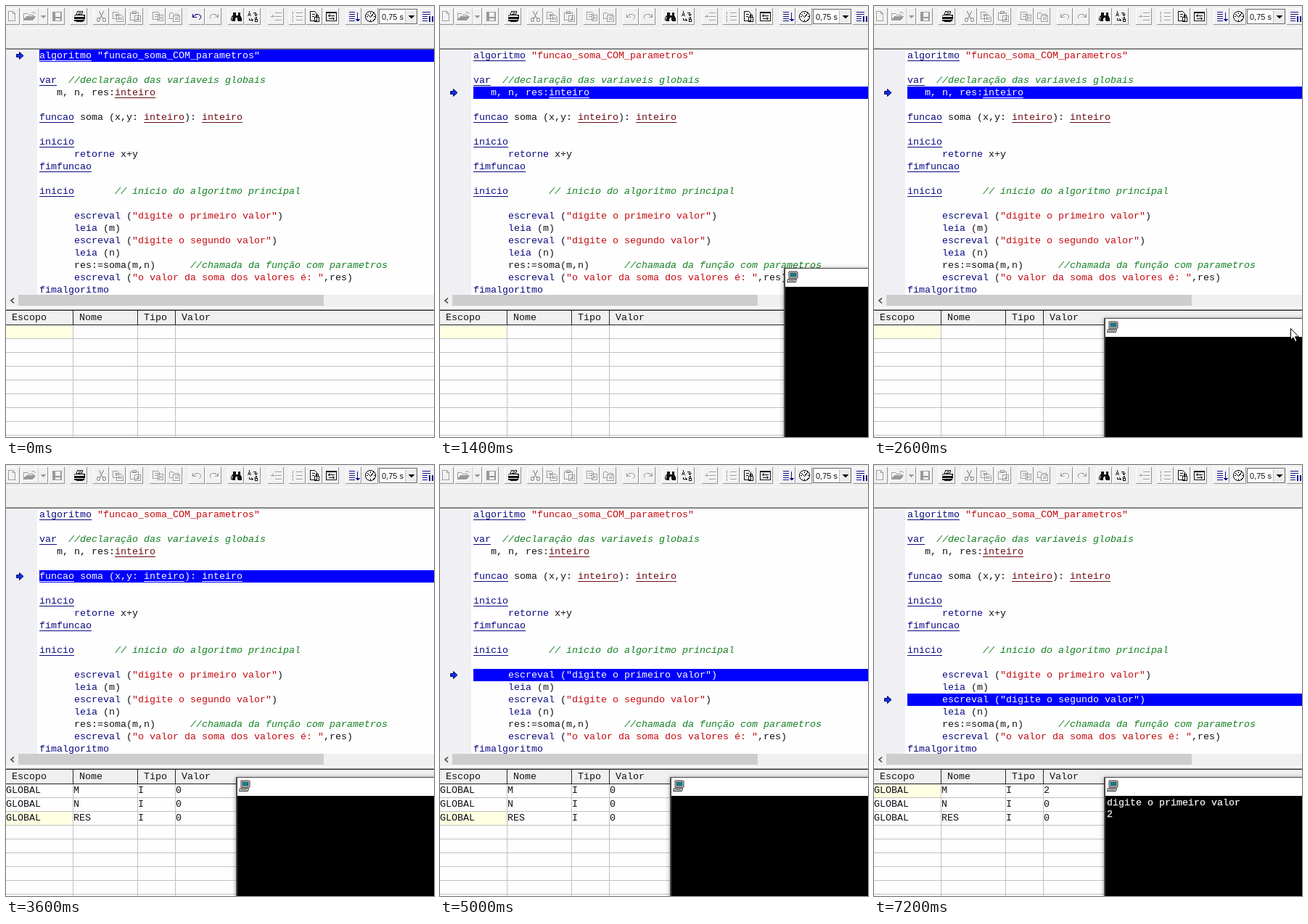
An HTML page for the animation above (8 s loop, 590 by 594 pixels).

```html
<!DOCTYPE html>
<html lang="pt">
<head>
<meta charset="utf-8">
<title>Passo a passo</title>
<style>
html, body { margin: 0; width: 100%; height: 100%; overflow: hidden; background: #fff; }
svg { display: block; width: 590px; height: 594px; }
text { font: 13.333px "Liberation Mono", "Courier New", monospace; white-space: pre; fill: #101018; }
.ui { font: 11px "Liberation Sans", Arial, sans-serif; }
.key, .cmd { fill: #0a0a80; }
.type { fill: #6c0c14; }
.str { fill: #c40a10; }
.note { fill: #128020; font-style: italic; }
.bar { fill: none; }
.on .bar { fill: #0000fc; }
.on text, .on tspan, .on .line { fill: #fff; }
.term { fill: #f4f4f4; stroke: #f4f4f4; stroke-width: .25; }
#console { filter: drop-shadow(0 1px 3px rgba(0, 0, 0, .4)); }
.ico { color: #101010; }
.off { color: #999; }
.blue { color: #10108c; }
.ico path { fill: none; stroke: currentColor; }
.ico .solid { fill: currentColor; stroke: none; }
.ico .lit { stroke: none; }
.off .lit { stroke: #fff; }
</style>
</head>
<body>
<svg viewBox="0 0 590 594" shape-rendering="crispEdges">
  <rect width="590" height="594" fill="#fefefe"/>
  <rect width="590" height="59" fill="#f0f0f0"/>
  <path d="M0 30.500H590" stroke="#fafafa"/>
  <path d="M0 58.500H590" stroke="#a0a0a0"/>
  <path d="M0 59.500H590" stroke="#696969"/>
  <g id="tools"></g>
  <rect y="60" width="43" height="338" fill="#f0f0f4"/>
  <g id="code"></g>
  <g id="arrow" shape-rendering="auto">
    <path d="M14.5 6.5H18.5V3.5L24 8.5L18.5 13.5V10.5H14.5Z" fill="#1030e0" stroke="#000070"/>
  </g>
  <rect y="398" width="590" height="22" fill="#f0f0f0"/>
  <rect x="17" y="398" width="421" height="15" fill="#cdcdcd"/>
  <path d="M11 402.5L7 406L11 409.5" fill="none" stroke="#404040" stroke-width="1.6" shape-rendering="auto"/>
  <path d="M0 415.500H590" stroke="#fff"/>
  <g id="table"></g>
  <g id="console">
    <rect width="400" height="400" fill="#484848"/>
    <rect x="2" y="1" width="400" height="25" fill="#fff"/>
    <rect x="2" y="26" width="400" height="400" fill="#000"/>
    <g shape-rendering="auto">
      <path d="M7 5H18L19 6V14H7Z" fill="#d8d8d0" stroke="#333"/>
      <rect x="9" y="7" width="8" height="5" fill="#108098" stroke="#222" stroke-width=".6"/>
      <path d="M5.5 15.5H17.5L16.5 19.5H4.5Z" fill="#d8d8d0" stroke="#333"/>
      <path d="M7 17.5H15" stroke="#555"/>
    </g>
    <text id="out" class="term" x="4" y="39">digite o primeiro valor</text>
    <text id="typed" class="term" x="4" y="55">2</text>
    <rect id="caret" x="4" y="43" width="1" height="16" fill="#fff"/>
  </g>
  <path id="mouse" d="M.5 .5V16L4 12.7L6.6 18.5L9 17.4L6.5 11.8H11.3Z" fill="#fff" stroke="#000" shape-rendering="auto"/>
</svg>
<script>
const $ = id => document.getElementById(id);

// Toolbar: [left, width, icon class, outline around the button centre, filled parts]
const lines = 'M-2 -5H7M-2 0H7M-2 5H7';
const tools = [
  [-3, 22, 'off', 'M-5 -7H1L4 -4V6H-5ZM1 -7V-4H4'],
  [21, 37, 'off', 'M-15 5V-4H-10L-8 -2H-2V0M-15 5L-11 0H1L-3 5ZM-4 -5Q0 -7 1 -3', 'M-15 5L-11 0H1L-3 5Z'],
  [59, 22, 'off', 'M-6 -6H6V6H-6Z', 'M-6 -6H-3V0H4V-6H6V6H4V2H-3V6H-6Z'],
  [89, 23, '', 'M-4 -1L-2 -7H5L4 -1M-7 0L-5 -2H8L6 0M8 -2V3L6 5M-4 7H5M-1 -5H3M-2 -3H2', 'M-7 0H7V3H-7ZM-7 4H7V6H-7Z'],
  [120, 22, 'off', 'M-3 -7L2 3M3 -7L-2 3M-4 2A2 2.5 0 1 0 -3.9 2M4 2A2 2.5 0 1 0 4.1 2'],
  [143, 22, 'off', 'M-7 -6H-1L1 -4V3H-7ZM-5 -3H-1M-5 -1H-1M-2 -2H4L7 1V7H-2ZM0 2H5M0 4H5'],
  [167, 22, 'off', 'M-7 -5H4V5H-7ZM-4 -7H1V-4H-4ZM-1 -1H7V7H-1ZM1 2H5M1 4H5'],
  [198, 22, 'off', 'M-7 -6H0L2 -4V4H-7ZM-5 -3H0M-5 0H0M0 -2H7V6H0ZM2 1H5M2 3H5'],
  [221, 22, 'off', 'M-7 -5H-3L-1 -3H5V0M-7 -5V3H-3M-2 -1H7V7H-2ZM0 2H5M0 4H5'],
  [252, 22, 'undo', 'M-6 -4V1H-1M-6 1Q-2 -5 4 -2Q7 1 3 4'],
  [275, 22, 'off', 'M6 -4V1H1M6 1Q2 -5 -4 -2Q-7 1 -3 4'],
  [306, 22, '', 'M-4 -5V-2L-7 2V5H-2V0H2V5H7V2L4 -2V-5', 'M-6 1H-2V6H-6ZM2 1H7V6H2ZM-4 -6H-1V2H-5ZM2 -6H5V2H2ZM-2 -2H2V1H-2Z'],
  [329, 22, '', 'M-7 0L-5 -6L-3 0M-6 -2H-4M3 1V7H6V4H3M3 4H5V1H3M0 -5H4V-1M2 -3L4 -1L6 -3M-5 2V5H0M-2 3L0 5L-2 7'],
  [361, 22, 'off', lines + 'M-8 0H-3M-5 -2L-3 0L-5 2'],
  [390, 23, 'off', lines + 'M-6 -7V-3M-6 -2V2M-6 3V7'],
  [414, 22, '', 'M-6 -7H0L3 -4V6H-6ZM-4 -3H0M-4 0H-1M0 1H6V7H0ZM2 1V-2H5V1M3 3V5'],
  [437, 22, '', 'M-7 -6H7V6H-7ZM-7 -5H7M-4 -1H4M-4 -1L-2 -3M-4 -1L-2 1M4 3H-4M4 3L2 1M4 3L2 5'],
  [468, 22, 'blue', 'M-7 -6H1M-7 -3H1M-7 0H1M-7 3H1M-7 6H1M5 -6V5', 'M2 3H9L5.5 7Z'],
  [491, 22, '', 'M-7 0A7 7 0 1 0 7 0A7 7 0 1 0 -7 0M-4 -3L0 1L4 -4M0 -6V-4M0 4V6M-6 0H-4M4 0H6'],
  [569, 22, 'blue', 'M-7 -6H4M-7 -3H4M-7 0H0M-7 3H0M-7 6H0', 'M2 -1H4V7H2ZM6 -1H8V7H6Z']
];
$('tools').innerHTML = tools.map(([x, w, cls, d, solid = '']) => `
  <rect x="${x}" y="3" width="${w}" height="23" fill="#f1f1f1"/>
  <path d="M${x + .5} 26V3.500H${x + w}" fill="none" stroke="#fff"/>
  <path d="M${x} 25.500H${x + w - .5}V3" fill="none" stroke="#949494"/>
  <g class="ico ${cls}" transform="translate(${x + (w >> 1) + .5} 14.5)">
    <path class="lit" transform="translate(1 1)" d="${d}"/><path d="${d}"/><path class="solid" d="${solid}"/>
  </g>`).join('') + `
  <path d="M44.500 3V26" stroke="#d0d0d0"/>
  <path d="M47 13H55L51 17Z" fill="#999"/>
  <rect x="514.5" y="4.5" width="52" height="20" fill="#fff" stroke="#696969"/>
  <rect x="550" y="6" width="16" height="18" fill="#ececec"/>
  <path d="M550.500 6V24" stroke="#c0c0c0"/>
  <path d="M554 13H563L558.500 17.500Z" fill="#000"/>
  <text class="ui" x="518" y="19">0,75 s</text>`;

// Editor
const source = `algoritmo "funcao_soma_COM_parametros"

var  //declaração das variaveis globais
   m, n, res:inteiro

funcao soma (x,y: inteiro): inteiro

inicio
      retorne x+y
fimfuncao

inicio       // inicio do algoritmo principal

      escreval ("digite o primeiro valor")
      leia (m)
      escreval ("digite o segundo valor")
      leia (n)
      res:=soma(m,n)      //chamada da função com parametros
      escreval ("o valor da soma dos valores é: ",res)
fimalgoritmo`.split('\n');
const left = 46, charW = 8, rowH = 17, rowY = i => 60 + i * rowH;
const token = /(?<note>\/\/.*)|(?<str>".*?")|(?<key>\b(?:algoritmo|var|funcao|inicio|fimfuncao|fimalgoritmo)\b)|(?<cmd>\b(?:retorne|escreval|leia)\b)|(?<type>\binteiro\b)/g;

function codeRow(src, i) {
  let body = '', rules = '', pos = 0;
  for (const m of src.matchAll(token)) {
    const cls = Object.keys(m.groups).find(k => m.groups[k]);
    body += src.slice(pos, m.index) + `<tspan class="${cls}">${m[0]}</tspan>`;
    pos = m.index + m[0].length;
    if (cls === 'key' || cls === 'type')
      rules += `<rect class="line ${cls}" x="${left + m.index * charW}" y="15" width="${m[0].length * charW}" height="1"/>`;
  }
  body += src.slice(pos);
  return `<g transform="translate(0 ${rowY(i)})"><rect class="bar" x="${left}" width="544" height="17"/>
    <text x="${left}" y="12">${body}</text>${rules}</g>`;
}
$('code').innerHTML = source.map(codeRow).join('');
const rows = [...$('code').children];

// Variable table
const cols = [0, 93, 182, 234];
const cells = (words, y, pad) => words.map((w, i) => `<text x="${cols[i] + pad}" y="${y}">${w}</text>`).join('');
let grid = '';
for (let y = 458.5; y < 594; y += 19) grid += `M0 ${y}H590`;
$('table').innerHTML = `
  <rect y="439" width="590" height="155" fill="#fefefe"/>
  <rect id="cell" width="92" height="18" fill="#ffffe1"/>
  <path d="${grid}M92.500 440V594M181.500 440V594M233.500 440V594" stroke="#c0c0c0"/>
  <rect y="420" width="590" height="19" fill="#f0f0f0"/>
  <path d="M0 418.500H590" stroke="#a0a0a0"/>
  <path d="M0 420.500H590M93.500 420V439M182.500 420V439M234.500 420V439" stroke="#fff"/>
  <path d="M0 419.500H590M0 439.500H590M92.500 420V440M181.500 420V440M233.500 420V440" stroke="#202020"/>
  ${cells(['Escopo', 'Nome', 'Tipo', 'Valor'], 433, 8)}
  <g id="vars">${['M', 'N', 'RES'].map((v, i) => cells(['GLOBAL', v, 'I', '0'], 452 + i * 19, 0)).join('')}</g>`;
const valueM = $('vars').children[3];

// Timelines: [start ms, value...]
const steps = [[0, 0], [600, 2], [1400, 3], [3600, 5], [4400, 11], [5000, 13], [5600, 14], [7200, 15]];
const drag = [[0, 600, 600], [1400, 474, 361], [1600, 426, 384], [1800, 366, 417], [2000, 321, 439], [2200, 318, 433], [2400, 317, 430]];
const pointer = [[0, 700, 700], [2000, 579, 453], [2200, 576, 448], [2400, 575, 445], [2600, 574, 444], [2800, 576, 445], [3000, 700, 700]];
const at = (list, t) => list.findLast(e => e[0] <= t);
const show = (el, on) => { el.style.visibility = on ? 'visible' : 'hidden'; };
const move = (el, x, y) => el.setAttribute('transform', `translate(${x} ${y})`);
const undo = document.querySelector('.undo');

function draw() {
  const t = performance.now() % 8000;
  const row = at(steps, t)[1];
  rows.forEach((r, i) => r.classList.toggle('on', i === row));
  move($('arrow'), 0, rowY(row));
  undo.classList.toggle('blue', t < 600);
  undo.classList.toggle('off', t >= 600);
  move($('console'), ...at(drag, t).slice(1));
  move($('mouse'), ...at(pointer, t).slice(1));
  show($('vars'), t >= 3600);
  move($('cell'), 0, t >= 3600 && t < 7200 ? 478 : 440);
  valueM.textContent = t < 7200 ? '0' : '2';
  show($('out'), t >= 5600);
  show($('caret'), t >= 6600 && t < 6800);
  show($('typed'), t >= 6800);
  requestAnimationFrame(draw);
}
draw();
</script>
</body>
</html>
```
